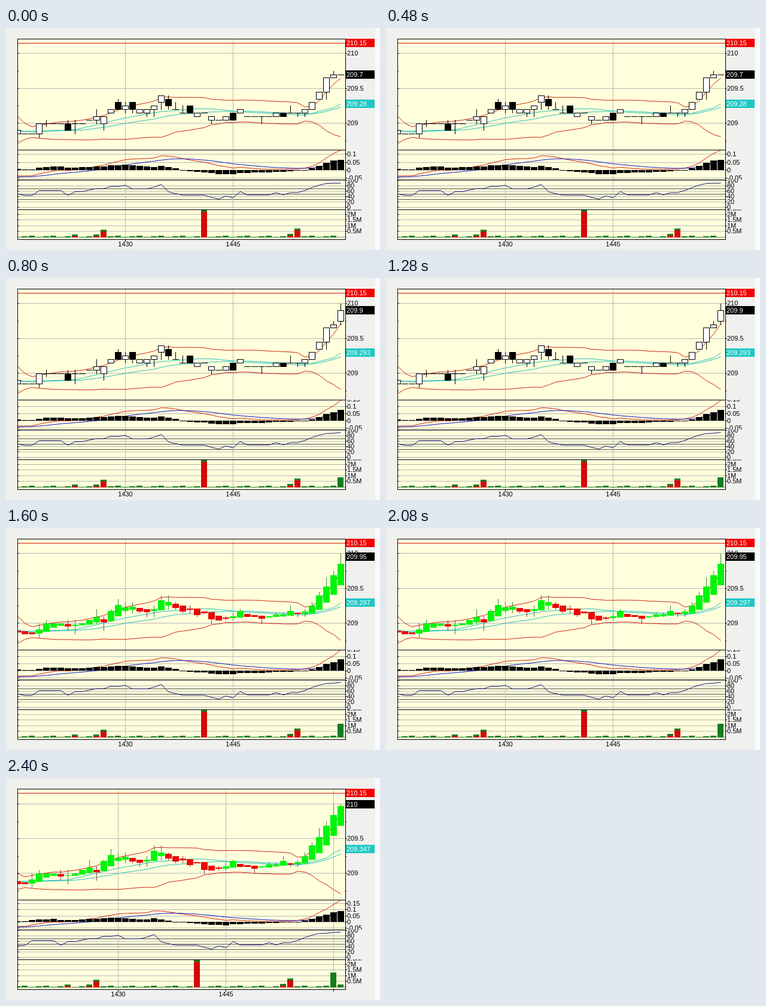
These frames come from a looping animation (625x372 px, 3200 ms). An HTML page with a canvas:

```html
<!DOCTYPE html>
<html>
<head>
<meta charset="utf-8">
<style>
html, body { margin: 0; width: 100%; height: 100%; overflow: hidden; background: #f0f0ee; }
canvas { display: block; }
</style>
</head>
<body>
<canvas id="chart" width="625" height="372"></canvas>
<script>
const ctx = document.getElementById('chart').getContext('2d');
const LEFT = 19, RIGHT = 567, TOP = 18, MACD_TOP = 204, RSI_TOP = 254, VOLUME_TOP = 304, BOTTOM = 354;
const STEP = 12, GRID = '#b9b9b9', RED = '#d2230f', CYAN = '#28beb9';

// Prices are ticks of 0.05 above 209; every indicator is computed from them
const opens = [-3, -3, -3, -3, 0, 0, 0, 0, 0, 0, 1, 1, 0, 3, 6, 4, 6, 3, 3, 4, 6, 7, 4, 3,
  5, 2, 3, 1, 1, 1, 3, 3, 2, 2, 2, 2, 2, 3, 3, 3, 3, 4, 7, 9, 13];
const closes = [-2, -3, -3, 0, 0, 0, 0, -2, 0, 0, 1, 2, 2, 4, 4, 5, 4, 4, 4, 5, 8, 5, 4, 3,
  3, 3, 3, 2, 1, 2, 1, 4, 2, 2, 2, 2, 3, 2, 3, 3, 4, 6, 9, 13, 14];
// Candle index and the price its wick reaches
const wicks = [[3, -4], [4, 1], [4, -1], [7, 1], [8, 1], [8, -3], [11, 4], [11, 0], [12, -2], [14, 7],
  [15, 6], [15, 3], [16, 3], [18, 2], [19, 2], [20, 4], [21, 8], [21, 4], [22, 6], [23, 5], [27, 0],
  [34, 0], [38, 5], [39, 2], [40, 2], [43, 7], [44, 15]];
const earlier = [[-19, 5], [-17, -2], [-11, -2], [-9, -4], [-5, -3], [-1, -1]];
const meanKeys = [[0, -2.3], [8, -1.8], [15, 1.6], [20, 3.4], [25, 4.2], [27, 4.2], [32, 3.2], [40, 2.4], [44, 4.5]];
const volumeSpikes = { 8: 5, 11: 5, 12: 13, 26: 46, 38: 6, 39: 15 };

// candles and means run from index 45 on; macd: zero line height and pixels per tick
const views = [
  { candles: [[14, 14, 14, 14]], means: [209.28], volume: [0], macd: [238, 13.3] },
  { candles: [[15, 20, 14, 18]], means: [209.293], volume: [17], macd: [239, 12] },
  { candles: [[15, 20, 14, 19]], means: [209.297], volume: [23], macd: [239, 12], smooth: true },
  { candles: [[15, 20, 14, 18], [19, 20, 19, 20]], means: [209.297, 209.347], volume: [25, 5],
    macd: [241, 10.3], smooth: true }
];

// Value at x on the line through key points
function along(keys, x) {
  const k = Math.max(1, keys.findIndex(p => p[0] >= x));
  const [x0, y0] = keys[k - 1], [x1, y1] = keys[k];
  return y0 + (y1 - y0) * (x - x0) / (x1 - x0);
}

const pastCloses = Array.from({ length: 19 }, (_, k) => along(earlier, k - 19));

function ema(values, period, seed) {
  let e = seed;
  return values.map((v, i) => i ? e += (v - e) * 2 / (period + 1) : e);
}

function bollinger(values) {
  const all = pastCloses.concat(values);
  return values.map((_, i) => {
    const span = all.slice(i, i + 20);
    const mid = span.reduce((a, b) => a + b) / 20;
    const dev = 2 * Math.sqrt(span.reduce((a, b) => a + (b - mid) ** 2, 0) / 20);
    return [mid, mid + dev, mid - dev];
  });
}

function relativeStrength(values) {
  const keep = 6 / 7;
  let gain = 5, loss = 5;
  return values.map((v, i) => {
    const change = i ? v - values[i - 1] : 0;
    gain = gain * keep + Math.max(change, 0);
    loss = loss * keep + Math.max(-change, 0);
    return 100 * gain / (gain + loss);
  });
}

function heikinAshi(bars) {
  let prevOpen = -2, prevClose = -2.2;
  return bars.map(([o, h, l, c]) => {
    const open = (prevOpen + prevClose) / 2, close = (o + h + l + c) / 4;
    prevOpen = open;
    prevClose = close;
    return [open, Math.max(h, open), Math.min(l, open), close];
  });
}

function rect(x, y, w, h, color) {
  ctx.fillStyle = color;
  ctx.fillRect(Math.round(x), Math.round(y), Math.round(w), Math.round(h));
}

function hline(y, color) { rect(LEFT, y, RIGHT - LEFT, 1, color); }

function clipped(x, y, w, h, paint) {
  ctx.save();
  ctx.beginPath();
  ctx.rect(x, y, w, h);
  ctx.clip();
  paint();
  ctx.restore();
}

function panel(top, bottom, paint) { clipped(LEFT, top, RIGHT - LEFT, bottom - top, paint); }

function text(s, x, y, color = '#000', align = 'left') {
  ctx.font = '11px "Liberation Sans", Arial, sans-serif';
  ctx.textAlign = align;
  ctx.fillStyle = color;
  ctx.fillText(s, x, Math.round(y) + 4);
}

function tag(s, y, color) {
  clipped(568, y - 7, 48, 14, () => {
    rect(568, y - 7, 48, 14, color);
    text(s, 569, y, '#fff');
  });
}

// Grid lines, ticks and labels of one panel
function axis(top, bottom, labels, yOf) {
  for (const label of labels) {
    const y = Math.round(yOf(parseFloat(label)));
    if (y > top && y < bottom) {
      hline(y, GRID);
      rect(LEFT, y, 3, 1, '#000');
      rect(RIGHT, y, 3, 1, '#000');
    }
    clipped(RIGHT, top, 50, bottom - top, () => text(label, 570, y));
  }
}

function curve(values, color, xOf, yOf) {
  ctx.strokeStyle = color;
  ctx.lineWidth = 1;
  ctx.beginPath();
  values.forEach((v, i) => ctx.lineTo(xOf(i), yOf(v) + .5));
  ctx.stroke();
}

function candle(x, bar, smooth, yOf) {
  const [yo, yh, yl, yc] = bar.map(t => Math.round(yOf(t)));
  const top = Math.min(yo, yc), height = Math.abs(yo - yc) + 1, up = bar[3] > bar[0];
  const body = !smooth ? '#000' : up ? '#00f50a' : '#eb0505';
  rect(x - .5, yh, 1, yl - yh + 1, smooth ? (up ? '#3c8c3c' : '#8c3c3c') : '#000');
  rect(x - 5.5, top, 11, height, body);
  if (!smooth && up) rect(x - 4.5, top + 1, 9, height - 2, '#fff');
}

function draw({ candles, means, volume, macd: [zero, tickHeight], smooth }) {
  const shift = candles.length - 1;
  const xOf = i => LEFT + .5 + STEP * (i - shift);
  const priceY = t => shift ? 159.8 - 5.81 * t : 159.5 - 5.85 * t;
  const macdY = t => zero - t * tickHeight;
  const rsiY = n => 300 - n * .45;

  const bars = opens.map((o, i) => {
    const reach = [o, closes[i], ...wicks.filter(w => w[0] === i).map(w => w[1])];
    return [o, Math.max(...reach), Math.min(...reach), closes[i]];
  }).concat(candles);
  const prices = bars.map(bar => bar[3]);
  const bands = bollinger(prices);
  const mean = closes.map((_, i) => along(meanKeys, i)).concat(means.map(m => (m - 209) * 20));
  const slowEma = ema(prices, 26, -1.6);
  const macd = ema(prices, 12, -2.3).map((e, i) => e - slowEma[i]);
  const signal = ema(macd, 9, -.83);

  rect(0, 0, 625, 372, '#f0f0ee');
  rect(617, 0, 8, 372, '#fafafa');
  rect(LEFT, TOP, RIGHT - LEFT, BOTTOM - TOP, '#ffffdc');

  axis(TOP, MACD_TOP, ['210', '209.5', '209'], p => priceY((p - 209) * 20) - .5);
  for (const t of [-5, 5, 15]) {
    rect(LEFT, priceY(t), 2, 1, '#000');
    rect(RIGHT, priceY(t), 2, 1, '#000');
  }
  axis(MACD_TOP, RSI_TOP, ['0.15', '0.1', '0.05', '0', '-0.05'], n => macdY(n * 20));
  axis(RSI_TOP, VOLUME_TOP, ['100', '80', '60', '40', '20', '0'], rsiY);
  axis(VOLUME_TOP, BOTTOM, ['2.5M', '2M', '1.5M', '1M', '0.5M'], n => 350 - n * 19.1);
  for (const n of [30, 50, 70]) hline(rsiY(n), '#55554b');

  for (const [i, label] of [[15, '1430'], [30, '1445'], [45, '']]) {
    if (!label && !shift) continue;
    const x = xOf(i);
    rect(x - .5, TOP, 1, BOTTOM - TOP, GRID);
    rect(x - .5, BOTTOM, 1, 4, '#000');
    text(label, x, 362, '#000', 'center');
  }

  panel(TOP, MACD_TOP, () => {
    hline(25, '#d7140a');
    curve(bands.map(b => b[1]), RED, xOf, priceY);
    curve(bands.map(b => b[2]), RED, xOf, priceY);
    curve(bands.map(b => b[0]), CYAN, xOf, priceY);
    curve(mean, CYAN, xOf, priceY);
    (smooth ? heikinAshi(bars) : bars).forEach((bar, i) => candle(xOf(i), bar, smooth, priceY));
  });

  panel(MACD_TOP, RSI_TOP, () => {
    curve(macd, RED, xOf, macdY);
    curve(signal, '#1414c8', xOf, macdY);
    macd.forEach((m, i) => {
      const n = m - signal[i];
      rect(xOf(i) - 5.5, macdY(Math.max(n, 0)), 11, Math.max(1, Math.abs(n) * tickHeight), '#000');
    });
  });

  panel(RSI_TOP, VOLUME_TOP, () => curve(relativeStrength(prices), '#141478', xOf, rsiY));

  panel(VOLUME_TOP, BOTTOM, () => {
    hline(350, '#8c8c78');
    bars.forEach((_, i) => {
      const height = volume[i - 45] ?? volumeSpikes[i] ?? 1 + i * 7 % 3;
      const green = i < 45 ? Math.min(3, height) : height;
      rect(xOf(i) - 5.5, 351 - height, 10, height, '#d20a0a');
      rect(xOf(i) - 5.5, 351 - height, 10, green, '#147d1e');
    });
  });

  for (const y of [TOP, MACD_TOP, RSI_TOP, VOLUME_TOP, BOTTOM]) hline(y, '#000');
  rect(LEFT, TOP, 1, BOTTOM - TOP + 1, '#000');
  rect(RIGHT, TOP, 1, BOTTOM - TOP + 1, '#000');

  const last = prices[prices.length - 1];
  tag('210.15', 25, '#f00000');
  tag(String(means[shift]), Math.round(priceY(mean[mean.length - 1])), '#1ec8c3');
  tag(String(+(209 + last / 20).toFixed(2)), Math.round(priceY(last)), '#000');
}

const start = performance.now();
function tick() {
  draw(views[Math.floor((performance.now() - start) / 800) % views.length]);
  requestAnimationFrame(tick);
}
tick();
</script>
</body>
</html>
```
